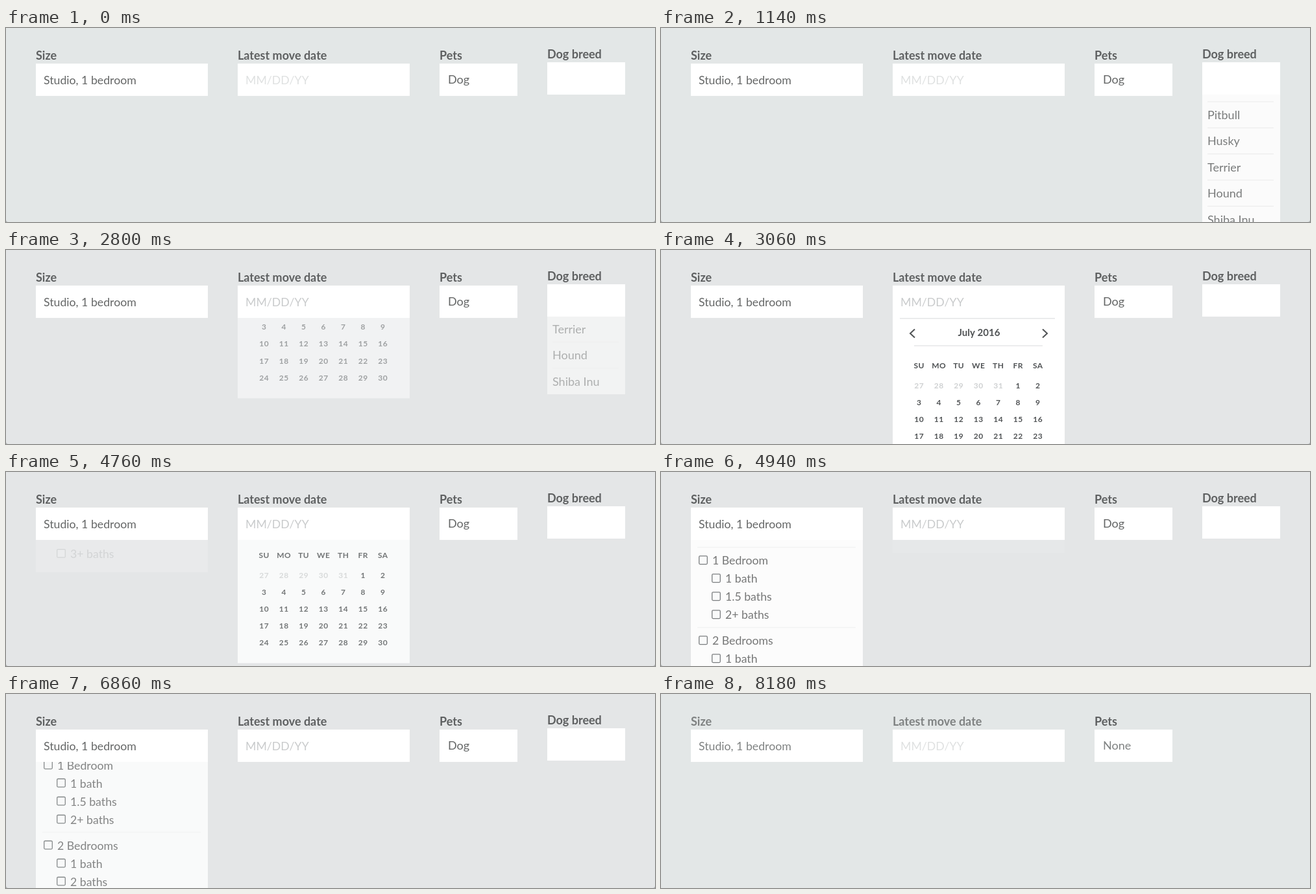
An HTML page with a canvas for the animation above (8220 ms loop, 1000 px wide and 300 px high).

```html
<!DOCTYPE html>
<html lang="en">
<head>
<meta charset="utf-8">
<title>Apartment search form</title>
<style>
html, body { margin: 0; width: 100%; height: 100%; overflow: hidden; background: #e3e7e7; }
canvas { display: block; width: 1000px; height: 300px; }
</style>
</head>
<body>
<canvas id="stage" width="1000" height="300"></canvas>
<script>
const ctx = document.getElementById('stage').getContext('2d');
const LOOP = 8220;
const SLIDE = 380;
const FONT = 'Lato, "Open Sans", sans-serif';
const INK = '#646666';
const LABEL = '#5e6061';
const PALE = '#7f8282';
const RULE = '#e8e8e8';
const SMALLER = 17.7;

const clamp = v => Math.min(1, Math.max(0, v));
const ease = u => u < 0.5 ? 2 * u * u : 1 - 2 * (1 - u) ** 2;
const progress = (t, start, length = SLIDE) => ease(clamp((t - start) / length));
const openness = (t, opens, closes) => progress(t, opens) - progress(t, closes);

function text(str, x, y, { color = INK, size = 18, weight = 400, align = 'left', spacing = 0 } = {}) {
  ctx.font = `${weight} ${size}px ${FONT}`;
  ctx.letterSpacing = spacing + 'px';
  ctx.textAlign = align;
  ctx.fillStyle = color;
  ctx.fillText(str, x, y);
}

function box(x, y, w, h, color = '#fff') {
  ctx.fillStyle = color;
  ctx.fillRect(x, y, w, h);
}

function field(label, x, y, w, color = LABEL) {
  text(label, x, y - 6, { color, weight: 700 });
  box(x, y, w, 50);
}

// A panel slides out from under its field while fading in.
function panel(x, top, w, bottom, open, drawContent) {
  if (open <= 0) return;
  ctx.save();
  ctx.beginPath();
  ctx.rect(x, top, w, 300 - top);
  ctx.clip();
  ctx.globalAlpha = open;
  ctx.translate(0, (open - 1) * (bottom - top));
  box(x, top, w, bottom - top);
  drawContent();
  ctx.restore();
}

function breedList() {
  const breeds = ['Poodle', 'Pitbull', 'Husky', 'Terrier', 'Hound', 'Shiba Inu'];
  breeds.forEach((name, i) => {
    const y = i ? 149 + (i - 1) * 40.4 : 106;
    box(842, y - 0.5, 102, 1, RULE);
    text(name, i ? 842 : 843, i ? y + 27 : 133.5);
  });
}

function chevron(x, tip) {
  ctx.beginPath();
  ctx.moveTo(x, 122.5);
  ctx.lineTo(tip, 129);
  ctx.lineTo(x, 135.5);
  ctx.strokeStyle = '#505355';
  ctx.lineWidth = 2;
  ctx.stroke();
}

function calendar() {
  box(368, 105, 239, 1.6, '#e6e7e8');
  box(390, 147.3, 198, 1.5, '#e6e7e8');
  chevron(391, 384);
  chevron(588, 595);
  text('July 2016', 490, 133, { color: '#505355', size: 15, weight: 700, align: 'center' });
  const cell = (str, col, y, color = '#505355') =>
    text(str, 397.7 + col * 30.5, y, { color, size: 12, weight: 700, align: 'center', spacing: 0.4 });
  ['SU', 'MO', 'TU', 'WE', 'TH', 'FR', 'SA'].forEach((day, i) => cell(day, i, 183));
  for (let i = 0; i < 35; i++) {
    const before = i < 5;
    cell(before ? 27 + i : i - 4, i % 7, 214 + Math.floor(i / 7) * 26.1, before ? '#cfd1d2' : undefined);
  }
}

function option(label, baseline, indent = 0) {
  ctx.beginPath();
  ctx.roundRect(58.7 + indent, baseline - 13.3, 12.6, 12.6, 1.5);
  ctx.fillStyle = '#f8f9f9';
  ctx.fill();
  ctx.strokeStyle = '#6a6e70';
  ctx.lineWidth = 1.3;
  ctx.stroke();
  text(label, 79 + indent, baseline, { size: SMALLER });
}

function sizeList() {
  [105, 151, 275].forEach(y => box(56, y - 0.5, 244, 1.5, '#f1f2f2'));
  option('Studio', 134);
  const group = (title, y, baths) => {
    option(title, y);
    baths.forEach((name, i) => option(name, y + 28 * (i + 1), 20));
  };
  group('1 Bedroom', 178, ['1 bath', '1.5 baths', '2+ baths']);
  group('2 Bedrooms', 302, ['1 bath', '2 baths', '3+ baths']);
}

function corners() {
  for (const [x, dir] of [[0, 1], [1000, -1]]) {
    ctx.beginPath();
    ctx.moveTo(x, 296.5);
    ctx.quadraticCurveTo(x, 300, x + 3.5 * dir, 300);
    ctx.lineTo(x, 300);
    ctx.fillStyle = '#a2a6a7';
    ctx.fill();
  }
}

function faded(alpha, draw) {
  if (alpha <= 0) return;
  ctx.save();
  ctx.globalAlpha = alpha;
  draw();
  ctx.restore();
}

function draw(t) {
  const resting = t >= 7140;
  const neutral = t >= 2620 && !resting;
  const noPets = progress(t, 7150);
  const label = resting ? PALE : LABEL;
  const ink = resting ? PALE : INK;
  box(0, 0, 1000, 300, neutral ? '#e4e6e7' : '#e3e7e7');

  panel(46, 105, 265, 408, openness(t, 4652, 6740), sizeList);
  panel(357, 105, 265, 346, openness(t, 2608, 4638), calendar);
  panel(834, 103, 120, 351, openness(t, 862, 2608), breedList);

  field('Size', 46, 55, 265, label);
  text('Studio, 1 bedroom', 58, 87, { color: ink, size: SMALLER });
  field('Latest move date', 357, 55, 265, label);
  text('MM/DD/YY', 369, 87, { color: neutral ? '#c9cbcc' : '#dfe1e1', size: SMALLER });
  field('Pets', 668, 55, 120);
  faded(1 - noPets, () => {
    text('Dog', 681, 86);
    field('Dog breed', 834, 53, 120);
  });
  faded(noPets, () => text('None', 681, 86, { color: ink }));
  if (!resting) corners();
}

const start = performance.now();
function tick() {
  draw((performance.now() - start) % LOOP);
  requestAnimationFrame(tick);
}
tick();
</script>
</body>
</html>
```
